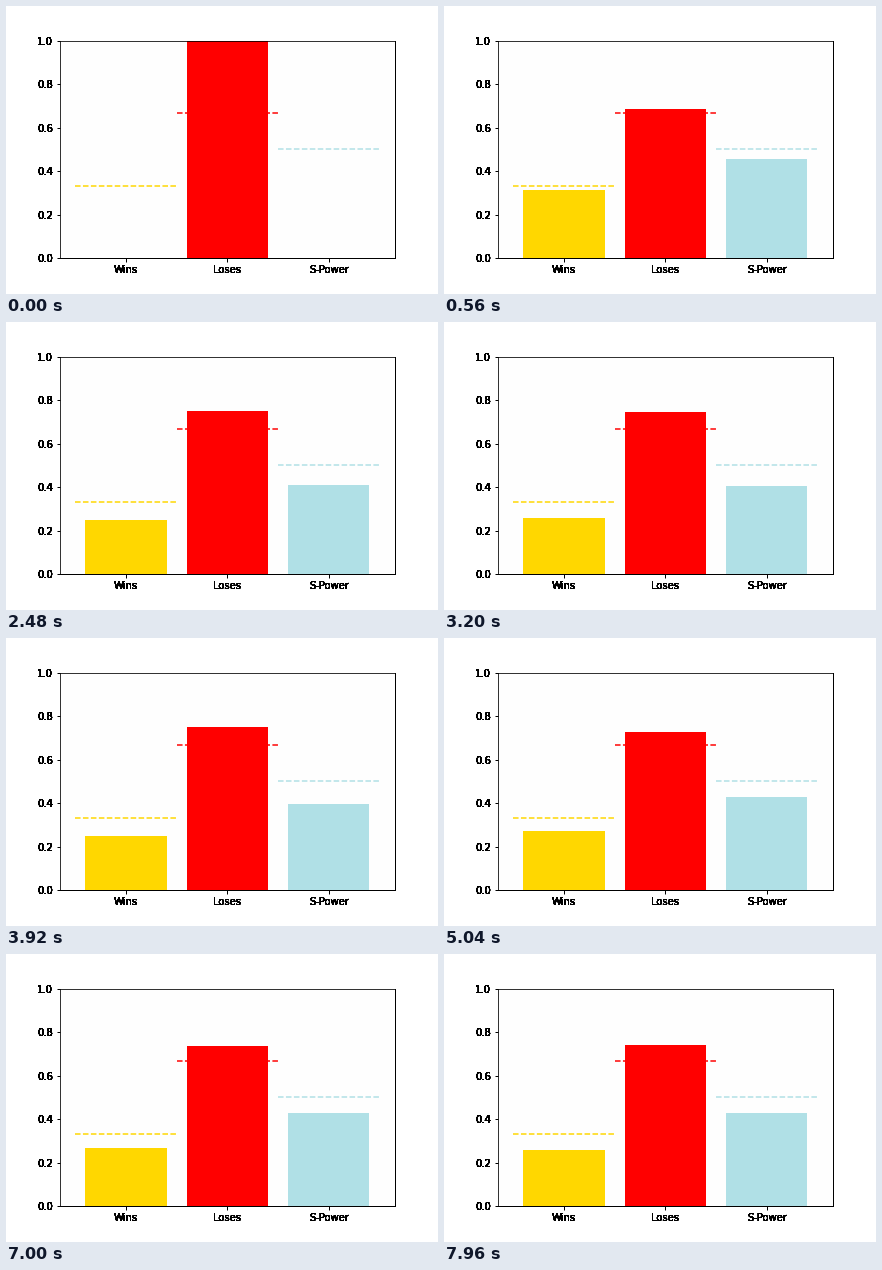
A matplotlib script for the animation above (8 s loop, 432 by 288 pixels).

```python
import numpy as np
import matplotlib.pyplot as plt
from matplotlib.animation import FuncAnimation

FRAMES = 200
INTERVAL = 40
LABELS = ["Wins", "Loses", "S-Power"]
COLORS = ["gold", "red", "powderblue"]
EXPECTED = [1 / 3, 2 / 3, 1 / 2]
WEIGHT = 16  # overprints that harden the label edges

# Lucky and unlucky spells: totals where each one ends, evenly paced between
GAMES = [3, 16, 25, 64, 100, 128, 201]
WINS = [0, 5, 5, 16, 25, 35, 52]
LOSSES = [2, 6, 10, 23, 38, 47, 70]


def tally(totals, games):
    return np.ceil(np.interp(games, GAMES, totals) - 1e-9)


def rates(frame):
    games = frame + 2
    won, lost = tally(WINS, games), tally(LOSSES, games)
    return won / games, 1 - won / games, won / (won + lost)


def label(x, y, text, placement):
    transform, va, ha = placement
    for _ in range(WEIGHT):
        ax.text(x, y, text, transform=transform, va=va, ha=ha)


plt.rcParams["font.family"] = "DejaVu Sans"
plt.rcParams["font.size"] = 10
fig = plt.figure(figsize=(6, 4), dpi=72, facecolor="white")
ax = fig.add_axes([0.125, 0.125, 0.775, 0.755], facecolor="#fefefe")

for x, (level, color) in enumerate(zip(EXPECTED, COLORS)):
    ax.hlines(level, x - 0.5, x + 0.5, colors=color, linestyles="dashed")
bars = ax.bar(range(3), rates(0), width=0.8, color=COLORS)

ax.set_xlim(-0.65, 2.65)
ax.set_ylim(0, 1)
ax.set_xticks(range(3))
ax.set_yticks(np.linspace(0, 1, 6))
ax.tick_params(width=1, labelbottom=False, labelleft=False)
ax.spines[["bottom", "right"]].set_linewidth(1)

for x, name in enumerate(LABELS):
    label(x, 0, name, ax.get_xaxis_text1_transform(7))
for y in np.linspace(0, 1, 6):
    label(0, y, f"{y:.1f}", ax.get_yaxis_text1_transform(7))


def update(frame):
    for bar, height in zip(bars, rates(frame)):
        bar.set_height(height)
    return bars.patches


anim = FuncAnimation(fig, update, frames=FRAMES, interval=INTERVAL,
                     repeat=True, repeat_delay=0, blit=False)
plt.show()
```
